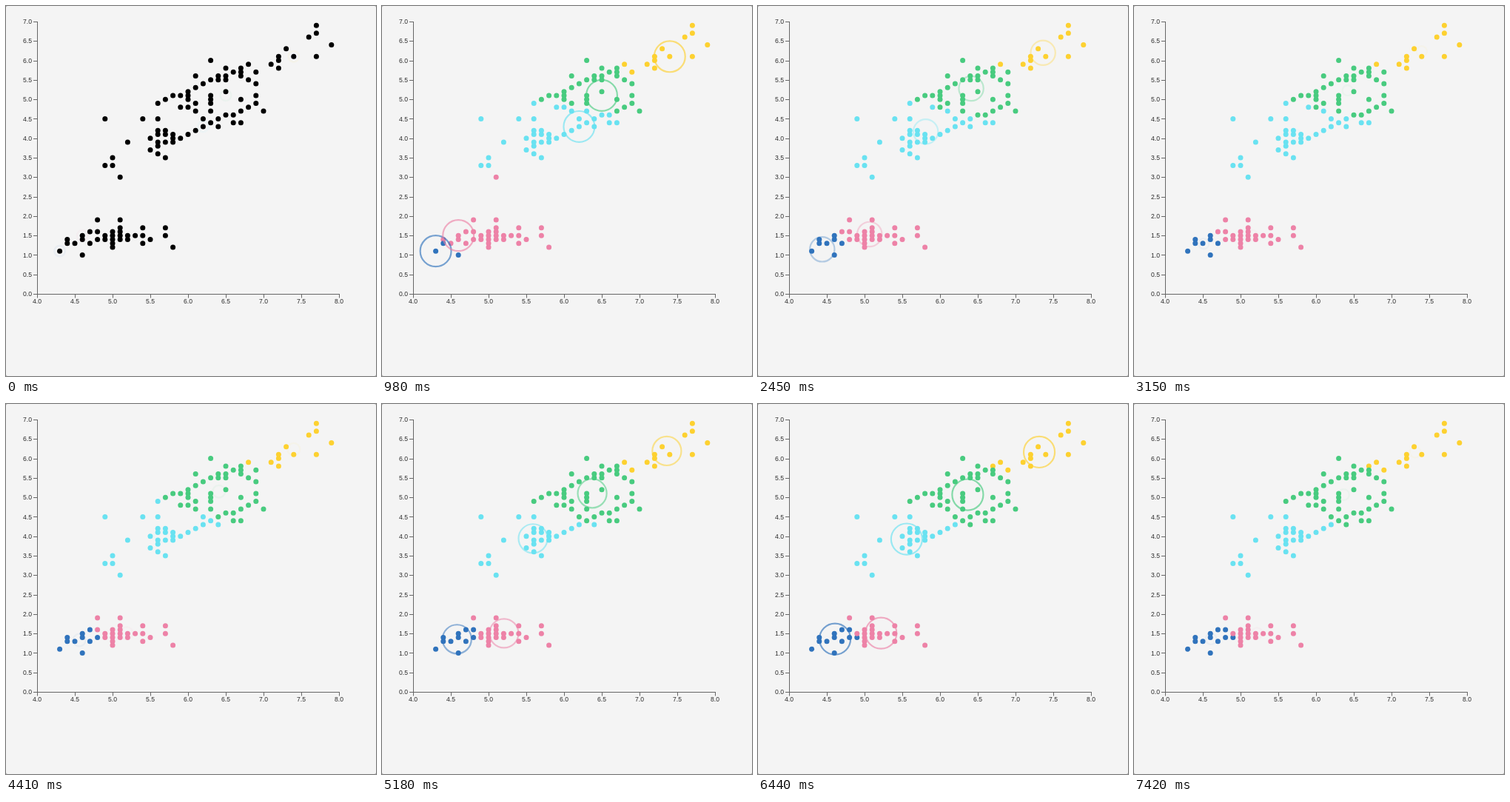
Write an HTML page that moves like this. It is 500 px wide and 500 px high and loops after 7490 ms.

```html
<!DOCTYPE html>
<html lang="en">
<head>
<meta charset="utf-8">
<title>Cluster steps</title>
<style>
  html, body { margin: 0; width: 100%; height: 100%; overflow: hidden; background: #999; }
  svg { display: block; width: 100vw; height: 100vh; background: #f4f4f4; border-radius: 2px; }
  text { font: 8.6px "Liberation Sans", Arial, sans-serif; fill: #2a2a2a; }
  .axis { stroke: #666; stroke-width: 1; fill: none; }
  .ring { fill: none; stroke-width: 2.2; }
</style>
</head>
<body>
<svg id="chart" viewBox="0 0 500 500"></svg>
<script>
const LOOP = 7490;
const STEPS = 5;
const STEP = 1250;
const ASSIGN = { start: 840, length: 130 };
const MOVE = { start: 1130, length: 270 };
const PULSE = { period: 4310, length: 3560, lead: 220 };

const black = [0, 0, 0];
const clusters = [
  { color: [48, 115, 188], seed: [4.3, 1.1] },
  { color: [237, 130, 167], seed: [4.6, 1.5] },
  { color: [105, 226, 241], seed: [6.2, 4.3] },
  { color: [72, 203, 127], seed: [6.5, 5.1] },
  { color: [253, 209, 48], seed: [7.4, 6.1] }
];

const px = x => 42 + (x - 4) * 102;
const py = y => 389 - y * 368 / 7;
const mix = (a, b, k) => a + (b - a) * k;
const clamp = v => Math.max(0, Math.min(1, v));
const ease = k => k < 0.5 ? 4 * k ** 3 : 1 - 4 * (1 - k) ** 3;

// Dots sit on a lattice of tenths; a map drops repeats
const lattice = new Map();
function dot(x, y) {
  lattice.set(`${x},${y}`, [x / 10, y / 10]);
}
function grid(x, y, cols, rows, dx = 1, dy = 1) {
  for (let i = 0; i < cols; i++)
    for (let j = 0; j < rows; j++) dot(x + i * dx, y + j * dy);
}
function slope(x, y, count, rise) {
  for (let i = 0; i < count; i++) dot(x + i, Math.round(y + i * rise));
}

function plantLowerCloud() {
  grid(44, 14, 5, 1, 2);
  grid(49, 14, 3, 2);
  grid(52, 15, 2, 1);
  grid(51, 15, 3, 2, 3, 2);
  grid(48, 16, 2, 2, 3, 3);
  grid(50, 12, 1, 5);
  grid(44, 13, 3, 1, 3);
  slope(46, 15, 2, 1);
  slope(54, 13, 2, 1);
}

function plantUpperCloud() {
  // Lower edge, upper edge and the steep tail
  slope(55, 37, 15, 0.85);
  slope(56, 49, 13, 0.8);
  slope(55, 40, 3, 1);
  slope(54, 45, 1, 0);
  slope(71, 59, 3, 2);
  slope(76, 66, 2, 1);
  // Regular patches between the edges
  grid(56, 41, 2, 2);
  grid(56, 36, 1, 4, 1, 3);
  grid(58, 39, 1, 3);
  grid(59, 48, 2, 2, 1, 3);
  grid(60, 50, 2, 2, 3, 1);
  grid(61, 47, 2, 2, 2, 2);
  grid(62, 43, 2, 2, 2, 2);
  grid(61, 56, 3, 1, 3);
  grid(65, 52, 1, 3, 1, 3);
  grid(67, 44, 1, 3, 1, 3);
  grid(67, 56, 1, 3);
  grid(69, 51, 1, 3, 1, 3);
  grid(72, 58, 1, 2, 1, 2);
  grid(74, 61, 2, 1, 3);
  grid(49, 33, 2, 1);
}

function plantOutliers() {
  const outliers = [
    [43, 11], [45, 13], [46, 10], [58, 12], [51, 30], [50, 35], [57, 35], [52, 39],
    [49, 45], [66, 44], [70, 47], [68, 55], [63, 60], [79, 64], [77, 69]
  ];
  outliers.forEach(([x, y]) => dot(x, y));
}

plantLowerCloud();
plantUpperCloud();
plantOutliers();
const points = [...lattice.values()];

function nearest([x, y], centers) {
  const distances = centers.map(([cx, cy]) => (x - cx) ** 2 + (y - cy) ** 2);
  return distances.indexOf(Math.min(...distances));
}

function average(list, axis) {
  return list.reduce((sum, p) => sum + p[axis], 0) / list.length;
}

// Run the clustering once; the animation plays through its history
const centers = [clusters.map(c => c.seed)];
const groups = [];
for (let step = 0; step < STEPS; step++) {
  const group = points.map(p => nearest(p, centers[step]));
  groups.push(group);
  centers.push(clusters.map((_, c) => {
    const members = points.filter((_, i) => group[i] === c);
    return [average(members, 0), average(members, 1)];
  }));
}

const svg = document.getElementById("chart");
function add(tag, attrs, text) {
  const node = document.createElementNS("http://www.w3.org/2000/svg", tag);
  for (const name in attrs) node.setAttribute(name, attrs[name]);
  if (text) node.textContent = text;
  return svg.appendChild(node);
}

function drawAxes() {
  add("path", { class: "axis", d: "M42.5 21V389.5H451" });
  for (let v = 0; v <= 7; v += 0.5) {
    const y = py(v);
    add("path", { class: "axis", d: `M37 ${Math.round(y) + 0.5}H42` });
    add("text", { x: 35, y: y + 3.1, "text-anchor": "end" }, v.toFixed(1));
  }
  for (let v = 4; v <= 8; v += 0.5) {
    const x = px(v);
    add("path", { class: "axis", d: `M${Math.round(x) + 0.5} 389V394.5` });
    add("text", { x, y: 402.2, "text-anchor": "middle" }, v.toFixed(1));
  }
}

drawAxes();
const dots = points.map(([x, y]) => add("circle", { cx: px(x), cy: py(y), r: 3.5 }));
const rings = clusters.map(c => add("circle", { class: "ring", stroke: `rgb(${c.color})` }));

// Index of the running step and its eased progress
function progress(t, { start, length }) {
  const step = Math.max(0, Math.min(STEPS - 1, Math.floor((t - start) / STEP)));
  return [step, ease(clamp((t - start - step * STEP) / length))];
}

function pulse(t) {
  const local = (t + PULSE.lead) % PULSE.period;
  return local < PULSE.length ? Math.sin(Math.PI * local / PULSE.length) ** 1.6 : 0;
}

function render(t) {
  const [assignStep, fade] = progress(t, ASSIGN);
  const colorAt = (step, i) => step < 0 ? black : clusters[groups[step][i]].color;
  dots.forEach((node, i) => {
    const from = colorAt(assignStep - 1, i);
    const to = colorAt(assignStep, i);
    node.setAttribute("fill", `rgb(${from.map((v, k) => Math.round(mix(v, to[k], fade)))})`);
  });

  const [moveStep, shift] = progress(t, MOVE);
  const strength = pulse(t);
  rings.forEach((ring, c) => {
    const [x0, y0] = centers[moveStep][c];
    const [x1, y1] = centers[moveStep + 1][c];
    ring.setAttribute("cx", px(mix(x0, x1, shift)));
    ring.setAttribute("cy", py(mix(y0, y1, shift)));
    ring.setAttribute("r", 6 + 18.6 * strength);
    ring.setAttribute("opacity", mix(0.05, 1, strength ** 2.2));
  });
}

const begin = performance.now();
function tick() {
  render((performance.now() - begin) % LOOP);
  requestAnimationFrame(tick);
}
tick();
</script>
</body>
</html>
```
